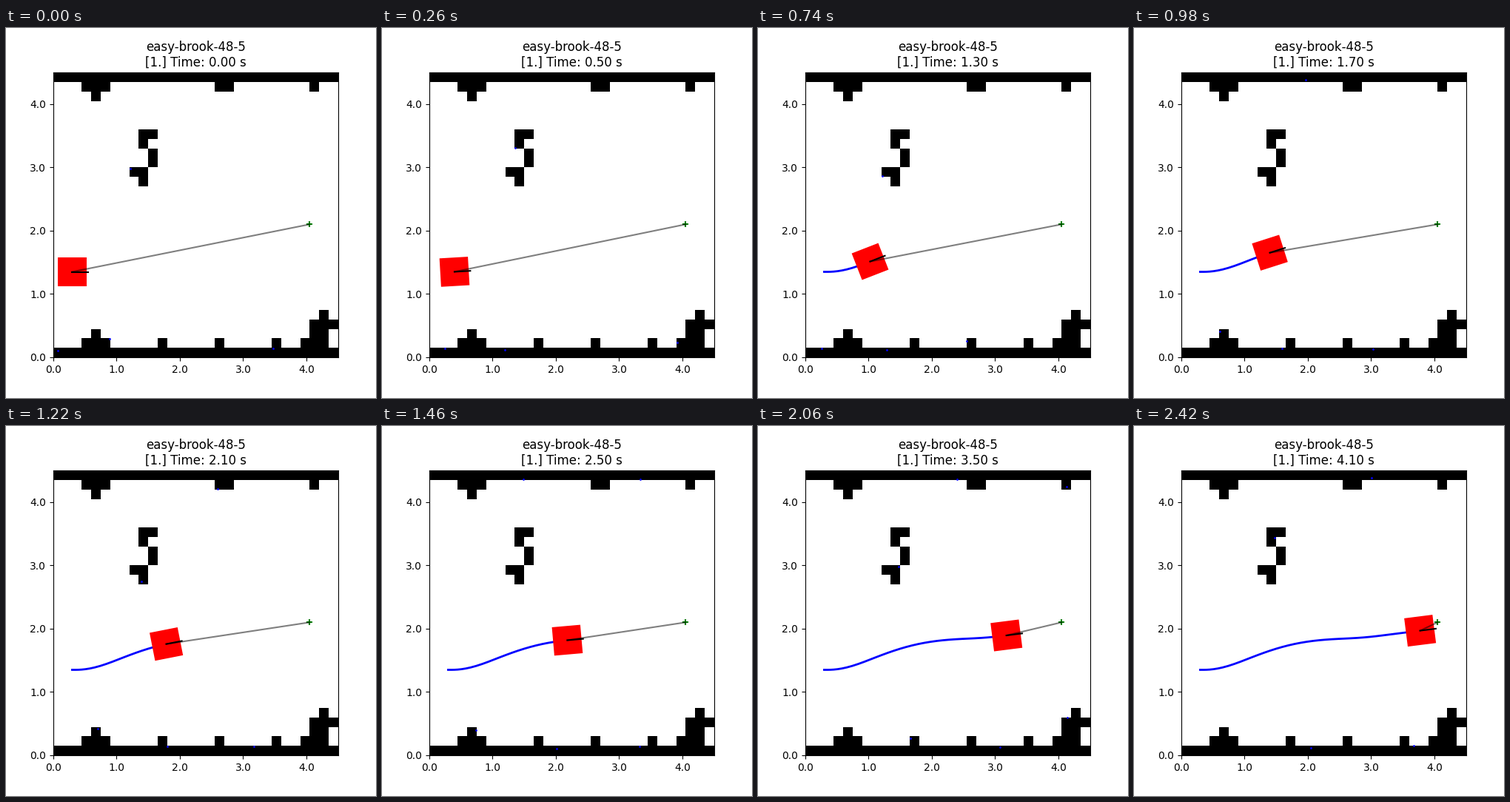
A matplotlib script that plays this animation: 500 by 500 pixels, repeating every 2440 ms.

```python
import numpy as np
import matplotlib.pyplot as plt
from matplotlib.animation import FuncAnimation
from matplotlib.patches import Polygon

SIZE, CELL, N = 4.5, 0.15, 30
DT, STEPS = 0.1, 42
START, GOAL = (0.3, 1.35), (4.05, 2.10)
ROBOT, NOSE = 0.45, 0.25

# Range sensor: beams fanned out around the rear, sampled at fixed distances
BEAMS = np.pi + np.radians(20 * 360 / 181) * np.arange(-4, 5)
RANGES = np.linspace(0, 4, 80)


def make_grid():
    """Occupancy map: two walls with bumps, a floating hook and a corner."""
    grid = np.zeros((N, N))

    def block(col, row, w=1, h=1):
        grid[row:row + h, col:col + w] = 1

    def mound(col, height):
        """Stepped pyramid on the floor of the map."""
        for y in range(height):
            half = height - 1 - y
            block(col - half, 1 + y, 2 * half + 1)

    # Build the ceiling as a floor, then turn the map over
    block(0, 0, N)
    mound(4, 2)
    block(17, 1, 2)
    mound(27, 1)
    grid[:] = grid[::-1].copy()

    block(0, 0, N)
    mound(4, 2)
    for col in (11, 17, 23):
        mound(col, 1)
    block(26, 1)
    block(27, 1, 2, 3)
    block(28, 3, 2)
    block(28, 4)

    block(9, 22, 1, 2)
    block(10, 23)
    block(10, 20, 1, 2)
    block(8, 19, 2)
    block(9, 18)
    return grid


def ease(t, t0, t1):
    """Smooth step from 0 at t0 to 1 at t1."""
    s = np.clip((t - t0) / (t1 - t0), 0, 1)
    return s * s * (3 - 2 * s)


def heading(t):
    """Swing left, straighten out, then settle on the way to the goal."""
    return np.radians(21.3 * ease(t, 0.25, 1.25)
                      - 18.6 * ease(t, 1.25, 2.85)
                      + 4.5 * ease(t, 2.85, 3.5))


def direction(angle):
    return np.stack([np.cos(angle), np.sin(angle)], axis=-1)


def drive():
    """Positions and headings of a robot speeding up to 1 m/s."""
    t = DT * np.arange(STEPS)
    theta = heading(t)
    moves = DT * np.minimum(t, 1.0)[:, None] * direction(theta)
    pos = START + np.vstack([np.zeros(2), np.cumsum(moves[:-1], axis=0)])
    return pos, theta


def scan(pos, theta):
    """First occupied sample along each beam, if there is one on the map."""
    hits = []
    for beam in BEAMS:
        points = pos + RANGES[:, None] * direction(theta + beam)
        cells = np.floor(points / CELL).astype(int)
        for point, (col, row) in zip(points, cells):
            if not (0 <= col < N and 0 <= row < N):
                break
            if grid[row, col]:
                hits.append(point)
                break
    return np.array(hits).reshape(-1, 2)


def corners(pos, theta):
    quarter = np.pi / 2 * np.arange(4) + np.pi / 4
    return pos + ROBOT / np.sqrt(2) * direction(theta + quarter)


grid = make_grid()
track, angles = drive()
scans = [scan(p, a) for p, a in zip(track, angles)]

fig, ax = plt.subplots(figsize=(5, 5), dpi=100)
ax.imshow(grid, cmap="gray_r", origin="lower", extent=(0, SIZE, 0, SIZE),
          interpolation="nearest")
ax.set_xticks(range(5))
ax.set_yticks(range(5))
ax.xaxis.set_major_formatter("{x:.1f}")
ax.yaxis.set_major_formatter("{x:.1f}")
title = ax.set_title("")

ax.scatter(*GOAL, s=36, marker="+", color="green", zorder=3)
path, = ax.plot([], [], color="blue", lw=2, zorder=2)
body = ax.add_patch(Polygon(corners(track[0], 0), fc="red", ec="none", zorder=3))
sight, = ax.plot([], [], color="black", alpha=0.5, lw=1.5, zorder=4)
nose, = ax.plot([], [], color="black", lw=1.5, zorder=5)
dots, = ax.plot([], [], "o", color="blue", ms=1, zorder=6)
ax.set_xlim(0, SIZE)
ax.set_ylim(0, SIZE)


def update(tick):
    # States alternate between 20 ms and 100 ms on screen
    k = 2 * (tick // 6) + (tick % 6 > 0)
    pos, theta = track[k], angles[k]
    title.set_text(f"easy-brook-48-5\n[1.] Time: {k * DT:.2f} s")
    path.set_data(*track[:k + 1].T)
    body.set_xy(corners(pos, theta))
    sight.set_data(*np.array([pos, GOAL]).T)
    nose.set_data(*np.array([pos, pos + NOSE * direction(theta)]).T)
    dots.set_data(*scans[k].T)
    return title, path, body, sight, nose, dots


anim = FuncAnimation(fig, update, frames=122, interval=20, repeat=True)
plt.show()
```
